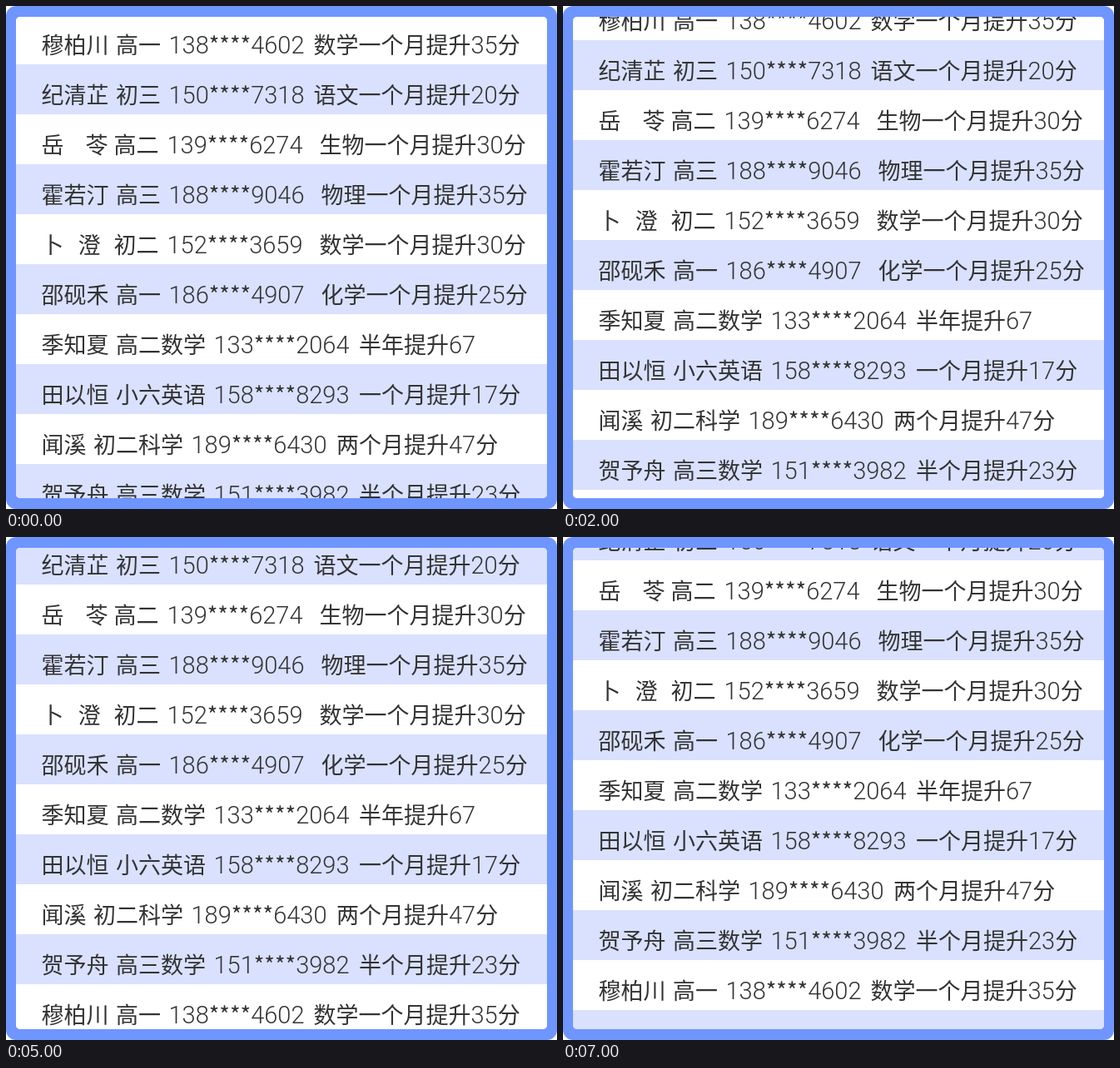
Recreate the animation shown at these times as an HTML page with a canvas. Size 662x604 px, loop 8000 ms.

```html
<!DOCTYPE html>
<html lang="zh-CN">
<head>
<meta charset="utf-8">
<style>
  html, body { margin: 0; width: 100%; height: 100%; overflow: hidden; background: #fff; }
  canvas { display: block; }
</style>
</head>
<body>
<canvas id="stage" width="662" height="604"></canvas>
<script>
const ctx = document.getElementById('stage').getContext('2d');
const LOOP = 8000, STEP = 1000;
const ROW_HEIGHT = 60, FIRST_TOP = 10, SPEED = 102 / 7;
const HAN_FONT = '300 27px "Noto Sans CJK SC", "Noto Sans CJK", sans-serif';
const DIGIT_FONT = '300 29px Roboto, "Liberation Sans", sans-serif';

// Each cell: text, left edge
const rows = [
  [['穆柏川', 42.5], ['高一', 132], ['138****4602', 195.5], ['数学一个月提升35分', 369.5]],
  [['纪清芷', 42.5], ['初三', 132], ['150****7318', 195.5], ['语文一个月提升20分', 369.5]],
  [['岳', 42.5], ['苓', 95.5], ['高二', 129.5], ['139****6274', 193.5], ['生物一个月提升30分', 376.5]],
  [['霍若汀', 42.5], ['高三', 132], ['188****9046', 195.5], ['物理一个月提升35分', 378.5]],
  [['卜', 42.5], ['澄', 86.5], ['初二', 129.5], ['152****3659', 193.5], ['数学一个月提升30分', 376.5]],
  [['邵砚禾', 42.5], ['高一', 132], ['186****4907', 195.5], ['化学一个月提升25分', 378.5]],
  [['季知夏', 42.5], ['高二数学', 132], ['133****2064', 249.5], ['半年提升67', 424]],
  [['田以恒', 42.5], ['小六英语', 132], ['158****8293', 249.5], ['一个月提升17分', 424]],
  [['闻溪', 42.5], ['初二科学', 105], ['189****6430', 222.5], ['两个月提升47分', 397]],
  [['贺予舟', 42.5], ['高三数学', 132], ['151****3982', 249.5], ['半个月提升23分', 424]]
];

function drawText(text, x, y) {
  for (const run of text.match(/\d+|\D+/g)) {
    ctx.font = /\d/.test(run) ? DIGIT_FONT : HAN_FONT;
    ctx.fillText(run, x, y);
    x += ctx.measureText(run).width;
  }
}

function panel(x, y, w, h, radius, color) {
  ctx.beginPath();
  ctx.roundRect(x, y, w, h, radius);
  ctx.fillStyle = color;
  ctx.fill();
}

function draw(time) {
  const step = Math.floor(time % LOOP / STEP);
  const offset = Math.round(step * SPEED);

  ctx.fillStyle = '#fff';
  ctx.fillRect(0, 0, 662, 604);
  panel(0, 0, 662, 604, 12, '#6f95ff');

  ctx.save();
  panel(12, 13, 638, 578, 5, '#fff');
  ctx.clip();
  for (let i = 0; i < rows.length + 2; i++) {
    const top = FIRST_TOP + i * ROW_HEIGHT - offset;
    ctx.fillStyle = i % 2 ? '#d9e1ff' : '#fff';
    ctx.fillRect(12, top, 638, ROW_HEIGHT);
    ctx.fillStyle = '#333';
    for (const [text, x] of rows[i % rows.length]) drawText(text, x, top + 47);
  }
  ctx.restore();
}

const start = performance.now();
function tick() {
  draw(performance.now() - start);
  requestAnimationFrame(tick);
}
tick();
</script>
</body>
</html>
```
